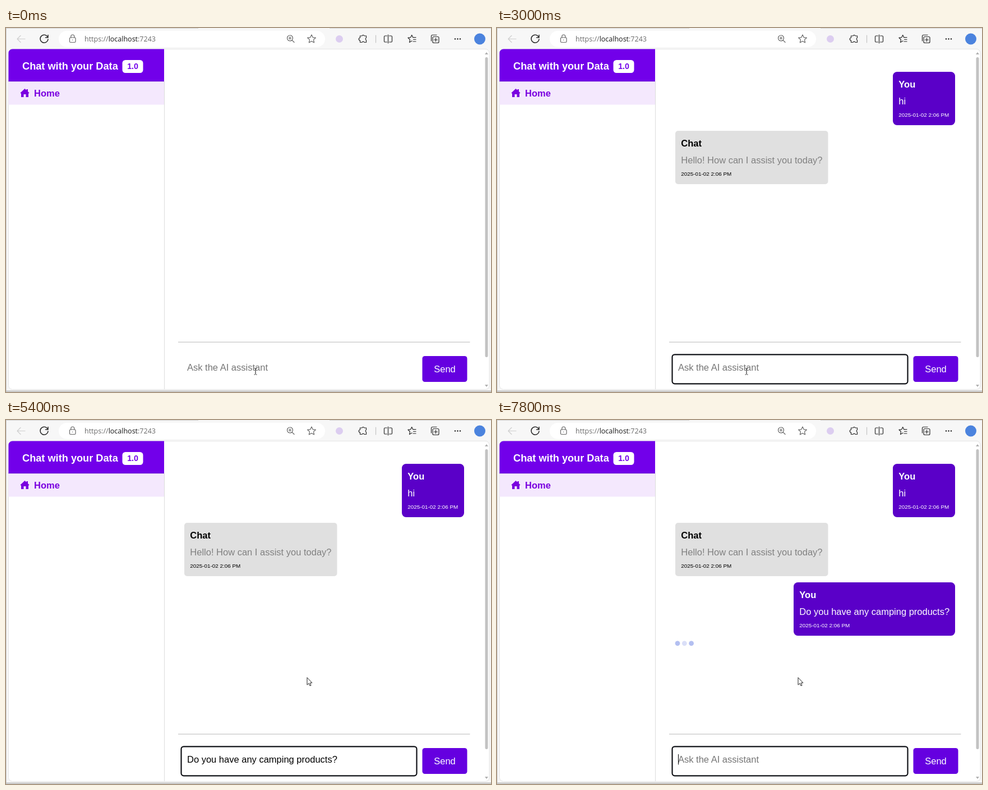
These frames come from a looping animation (865x648 px, 8000 ms). An HTML page:

```html
<!DOCTYPE html>
<html lang="en">
<head>
<meta charset="utf-8">
<title>Chat with your Data</title>
<style>
html, body { margin: 0; width: 100%; height: 100%; overflow: hidden; background: #f7f7f7; }
svg { display: block; width: 100vw; height: 100vh; }
text { font: 16.5px "Liberation Sans", Arial, sans-serif; white-space: pre; }
.b { font-weight: bold; }
.time { font-size: 9.9px; }
.ui { font: 12.3px "Open Sans", "Noto Sans", sans-serif; fill: #202020; }
.key { font-size: 11.3px; fill: #5c5c5c; text-anchor: end; }
.off { fill: #a6a6a6; }
.ico { fill: none; stroke: #2b2b2b; stroke-width: 1.2; stroke-linecap: round; stroke-linejoin: round; }
.ico.dim { stroke: #b4b4b4; }
#menuBox { filter: drop-shadow(0 3px 5px rgba(0, 0, 0, .28)); }
</style>
</head>
<body>
<svg viewBox="0 0 865 648" preserveAspectRatio="none">
  <!-- browser frame -->
  <rect width="865" height="648" fill="#f7f7f7"/>
  <path d="M0 .5H343M577 .5H865" stroke="#d4d4d4"/>
  <path d="M.5 0V648" stroke="#cfcfcf"/>
  <path d="M0 646.5H865" stroke="#bdbdbd" stroke-width="2"/>
  <rect x="94" y="5" width="475" height="29" rx="14.5" fill="#fff"/>
  <rect x="4.500" y="37.500" width="857.500" height="606" rx="7" fill="#fff" stroke="#e4e4e4"/>

  <!-- toolbar -->
  <path class="ico" style="stroke:#cfcfcf" d="M34 19.500H20M26 13.500L20 19.500L26 25.500"/>
  <g class="ico">
    <path stroke-width="1.500" d="M74.500 16.500A7 7 0 1 0 75 20M75 12.500V17H70.500"/>
    <g stroke="#666">
      <rect x="113.500" y="17" width="10.500" height="8.500" rx="1.500"/>
      <path d="M115.800 17V15a3 3 0 0 1 6 0V17M118.800 21v.5"/>
      <circle cx="506.500" cy="18" r="5"/>
      <path d="M510.300 21.800L514 25.500M504 18H509M506.500 15.500V20.500"/>
      <path id="star" d="M545 12l2.200 4.800 5.200.6-3.900 3.500 1.100 5.100-4.600-2.600-4.600 2.600 1.100-5.100-3.900-3.500 5.200-.6z"/>
    </g>
    <path d="M631.500 14H635a2.200 2.200 0 0 1 4 0H642.500V17.500a2.200 2.200 0 0 0 0 4V25.500H639a2.200 2.200 0 0 0-4 0H631.500V22a2.200 2.200 0 0 1 0-4.500z"/>
    <path stroke="#c4c4c4" d="M659.500 13V26"/>
    <path d="M679.500 14H676a1.500 1.500 0 0 0-1.500 1.500V23.500A1.500 1.500 0 0 0 676 25H679.500M683.500 14H687a1.500 1.500 0 0 1 1.500 1.500V23.500A1.500 1.500 0 0 1 687 25H683.500M681.500 12V27"/>
    <path d="M724 23l-4.500 2.600 1-4.900-3.600-3.300 4.800-.6L723.700 12.500l2 4.300H731M726.500 20.500H731M726 24H731"/>
    <rect x="761" y="15.500" width="11" height="11" rx="2"/>
    <path d="M758.500 23V14.500a2 2 0 0 1 2-2H768M766.500 18V24M763.500 21H769.500"/>
  </g>
  <g fill="#222"><circle cx="801" cy="19.500" r="1.200"/><circle cx="805.500" cy="19.500" r="1.200"/><circle cx="810" cy="19.500" r="1.200"/></g>
  <circle cx="594.500" cy="19.500" r="6.500" fill="#dccdf0"/>
  <circle cx="845" cy="19.500" r="10" fill="#4b83de"/>
  <text class="ui" x="140" y="24" style="font-size:12.500px;fill:#6a6a6a">https://<tspan fill="#1a1a1a">localhost</tspan>:7243</text>

  <!-- sidebar -->
  <path d="M4.500 95V44.500a7 7 0 0 1 7-7H282V95z" fill="#7200ea"/>
  <path d="M4.500 95H282" stroke="#5e00c6"/>
  <rect x="4.500" y="95.500" width="277.500" height="41" fill="#f4e8fd"/>
  <path d="M282.500 95V643" stroke="#dcdcdc"/>
  <text class="b" x="29" y="74" fill="#fff" style="font-size:18.200px">Chat with your Data</text>
  <rect x="207.500" y="57" width="37" height="23" rx="5.500" fill="#fff"/>
  <text class="b" x="226" y="73" text-anchor="middle" fill="#7200ea" style="font-size:14.200px">1.0</text>
  <path d="M25.500 115.500L33.500 108L36.500 110.700V109H39V113L41.500 115.500L40 116.700V123H35.500V118H31.500V123H27V116.700z" fill="#7a00e0"/>
  <text class="b" x="50" y="121.500" fill="#7a00e0">Home</text>

  <!-- page -->
  <rect x="854.500" y="52" width="5" height="534" rx="2.500" fill="#c2c2c2"/>
  <path d="M854 47L857 43L860 47zM854 635L857 639L860 635z" fill="#b0b0b0"/>
  <path d="M307 559.300H827.500" stroke="#cfcfcf" stroke-width="1.400"/>
  <rect id="focus" x="312.500" y="581.300" width="420" height="52" rx="4.500" fill="#fff" stroke="#111318" stroke-width="2.200"/>
  <text id="entry" x="323" y="610"></text>
  <path id="caret" stroke="#111" stroke-width="1.100"/>
  <rect x="742.500" y="584" width="80" height="46" rx="4.500" fill="#6500e0"/>
  <text x="782.500" y="612.500" text-anchor="middle" fill="#fff">Send</text>
  <g id="chat"></g>
  <g id="dots" fill="#4460dc"></g>

  <g id="menu">
    <rect id="menuBox" x="442" y="248" width="274" height="363" rx="7" fill="#f9f9f9" stroke="#d2d2d2" stroke-width=".7"/>
    <path d="M442.500 282.500H715.500M442.500 317.500H715.500M442.500 352H715.500M442.500 506.500H715.500M442.500 541.500H715.500M442.500 576.300H715.500" stroke="#e4e4e4"/>
    <rect id="hover" x="446" width="265.500" height="27" rx="3" fill="#efefef"/>
    <g id="rows"></g>
    <path d="M697.500 555.500L703 559L697.500 562.500z" fill="#444"/>
    <g class="ico">
      <circle cx="463" cy="265.500" r="6.700"/>
      <path d="M460 267.500a3.400 3.400 0 0 0 6 0M460.700 263.500v.2M465.300 263.500v.2"/>
      <rect x="460.700" y="292.500" width="4.600" height="9" rx="2.300"/>
      <path d="M458 299.500a5 5 0 0 0 10 0M463 304.500V307"/>
      <path d="M461 330L457.500 333.500L461 337M457.500 333.500H465a3.300 3.300 0 0 1 0 6.800H461"/>
      <path d="M459.500 424.500H457V436.500H461M465 424.500H467.500V426M459.500 423H465V426H459.500z"/>
      <rect x="461.500" y="427" width="7.500" height="10.500" rx="1.200"/>
      <path d="M462 526.500H457.500a1.500 1.500 0 0 1-1.500-1.500V519a1.500 1.500 0 0 1 1.500-1.500H468a1.500 1.500 0 0 1 1.500 1.500V521M465 517.500V521"/>
      <circle cx="466.500" cy="526" r="3.200" fill="#2b2b2b"/>
      <path stroke="#fff" d="M466.500 524.500V527.500M465 526H468"/>
      <path d="M461 598.500H457.500a1.500 1.500 0 0 1-1.500-1.500V590a1.500 1.500 0 0 1 1.500-1.500H468.500a1.500 1.500 0 0 1 1.500 1.500V597M463.500 593.500V601.500L465.600 599.200H468.700z"/>
    </g>
    <g class="ico dim">
      <path d="M459 363L465.500 372.500M467 363L460.500 372.500"/>
      <circle cx="459" cy="374.500" r="2.200"/><circle cx="467" cy="374.500" r="2.200"/>
      <rect x="460" y="392.500" width="8.500" height="11.500" rx="1.500"/>
      <path d="M457.800 395V404.500a2 2 0 0 0 2 2H466"/>
    </g>
  </g>

  <path id="beam" d="M442.500 605.500H444.300M445.700 605.500H447.500M445 606V616.500M442.500 617H444.300M445.700 617H447.500" stroke="#222" stroke-width="1.100"/>
  <path id="arrow" d="M0 0V13L3 10.300L5 14.700L7 13.800L5.100 9.500H9z" fill="#fff" stroke="#222" stroke-width="1"/>
</svg>
<script>
const $ = id => document.getElementById(id);
const show = (el, on) => el.style.display = on ? "" : "none";

const LOOP = 8000, FOCUS = 200, KEY1 = 1200, KEY2 = 1400, SEND1 = 1900, REPLY = 2200,
      MENU = 3700, PASTE = 4900, SEND2 = 6700;
const BLINKS = [FOCUS, KEY1, KEY2, SEND1, REPLY, PASTE, SEND2];
const QUESTION = "Do you have any camping products?";
const HINT = "Ask the AI assistant";

function bubble(x, y, w, who, msg) {
  const mine = who === "You", main = mine ? "#fff" : "#000";
  $("chat").insertAdjacentHTML("beforeend", `<g>
    <rect x="${x}" y="${y}" width="${w}" height="95" rx="${mine ? 7.5 : 5}" fill="${mine ? "#5a00c8" : "#e0e0e0"}"/>
    <text class="b" x="${x + 10.3}" y="${y + 28.3}" fill="${main}">${who}</text>
    <text x="${x + 10.3}" y="${y + 58.3}" fill="${mine ? "#fff" : "#808080"}">${msg}</text>
    <text class="time" x="${x + 10.3}" y="${y + 80.3}" fill="${main}">2025-01-02 2:06 PM</text></g>`);
  return $("chat").lastElementChild;
}
const bubbles = [
  [bubble(706, 78, 111, "You", "hi"), SEND1],
  [bubble(318, 183, 272.5, "Chat", "Hello! How can I assist you today?"), REPLY],
  [bubble(529, 289, 288, "You", QUESTION), SEND2]
];

// label, shortcut, centre y, disabled
const rows = [
  ["Emoji", "Win+Period", 265.5], ["Voice typing", "Win+H", 300], ["Undo", "Ctrl+Z", 335],
  ["Cut", "Ctrl+X", 369.5, 1], ["Copy", "Ctrl+C", 399.5, 1], ["Paste", "Ctrl+V", 429.5],
  ["Paste as plain text", "Ctrl+Shift+V", 459.5], ["Select all", "Ctrl+A", 489.5, 1],
  ["Open in sidebar", "", 524], ["Writing direction", "", 559], ["Inspect", "", 594]
];
$("rows").innerHTML = rows.map(([label, key, y, off]) =>
  `<text class="ui ${off ? "off" : ""}" x="481.500" y="${y + 4.5}">${label}</text>` +
  `<text class="ui key ${off ? "off" : ""}" x="682" y="${y + 4.3}">${key}</text>`).join("");

$("dots").innerHTML = [322, 334.3, 346.6].map(x => `<circle cx="${x}" r="4.400"/>`).join("");
const dots = [...$("dots").children];

function drawDots(t) {
  const first = t >= SEND1 && t < REPLY, second = t >= SEND2;
  show($("dots"), first || second);
  const start = first ? 1850 : 6560;
  dots.forEach((dot, i) => {
    const p = (t - start - i * 140) / 1100;
    const wave = 1 - Math.abs(1 - 2 * (p - Math.floor(p)));
    dot.setAttribute("cy", first ? 186.8 : 397.6);
    dot.setAttribute("opacity", p < 0 ? 1 : .2 + .8 * wave);
  });
}

function drawEntry(t, menuOpen) {
  const typed = t >= KEY1 && t < KEY2 ? "h" : t >= KEY2 && t < SEND1 ? "hi"
    : t >= PASTE && t < SEND2 ? QUESTION : "";
  const entry = $("entry");
  entry.textContent = typed || HINT;
  entry.setAttribute("fill", typed ? "#000" : "#757575");
  const x = 323.5 + (typed ? entry.getComputedTextLength() : 0);
  $("caret").setAttribute("d", `M${x} 595V613.500`);
  const last = BLINKS.filter(b => b <= t).pop();
  show($("caret"), t >= FOCUS && !menuOpen && Math.floor((t - last) / 500) % 2 === 0);
  show($("focus"), t >= FOCUS);
}

function drawPointer(t, menuOpen) {
  const p = Math.min(1, Math.max(0, (t - 3800) / 600));
  const e = p * p * (3 - 2 * p);
  const x = 442 + 95 * e, y = 611 - 152.5 * e;
  show($("menu"), menuOpen);
  show($("beam"), t < MENU);
  show($("arrow"), t >= MENU);
  $("arrow").setAttribute("transform", `translate(${x} ${y})`);
  const row = rows.find(r => Math.abs(r[2] - y) < 14 && !r[3]);
  show($("hover"), row);
  if (row) $("hover").setAttribute("y", row[2] - 13.5);
}

function draw(now) {
  const t = now % LOOP, menuOpen = t >= MENU && t < PASTE;
  bubbles.forEach(([el, at]) => show(el, t >= at));
  drawDots(t);
  drawEntry(t, menuOpen);
  drawPointer(t, menuOpen);
}

const t0 = performance.now();
function tick() {
  draw(performance.now() - t0);
  requestAnimationFrame(tick);
}
tick();
</script>
</body>
</html>
```
